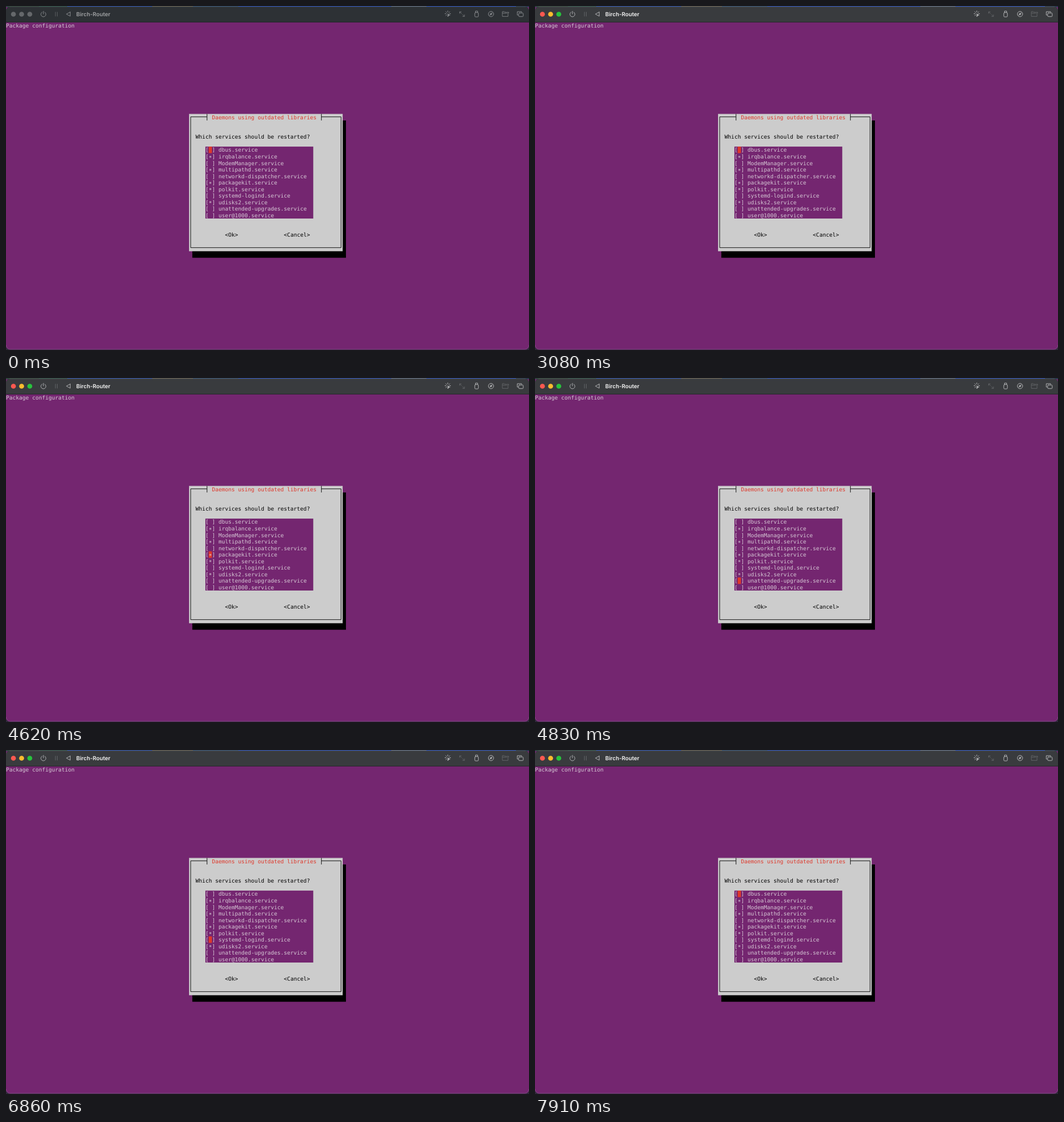
An HTML page with a canvas for the animation above (8 s loop, 923 by 607 pixels).

```html
<!DOCTYPE html>
<html lang="en">
<head>
<meta charset="utf-8">
<title>Package configuration</title>
<style>
  html, body { margin: 0; width: 100%; height: 100%; overflow: hidden; background: #742670; }
  canvas, svg { position: absolute; left: 0; top: 0; width: 923px; height: 607px; display: block; }
  text { font: 9.582px "DejaVu Sans Mono", monospace; text-rendering: geometricPrecision; white-space: pre; }
  #title { font: 600 9.8px Inter, sans-serif; }
</style>
</head>
<body>
<canvas id="stage" width="923" height="607"></canvas>
<svg id="labels" width="923" height="607" viewBox="0 0 923 607">
  <text id="title" x="124" y="18">Birch-Router</text>
</svg>
<script>
const W = 923, H = 607, LOOP = 8000;
// 160 columns of 8 x 16 cells, scaled to the stage width.
const CELL_W = W / 160, CELL_H = CELL_W * 2, TOP = 28.9;
const BASELINE = CELL_H * 13 / 16;
const PURPLE = '#742670', GRAY = '#cccccc', RED = '#de382b', LIGHT = '#d6c8d5';
const FOCUS_AT = 3080, LIST_ROW = 19;

const services = [
  ['dbus', 0], ['irqbalance', 1], ['ModemManager', 0], ['multipathd', 1],
  ['networkd-dispatcher', 0], ['packagekit', 1], ['polkit', 1],
  ['systemd-logind', 0], ['udisks2', 1], ['unattended-upgrades', 0], ['user@1000', 0]
];

const ctx = document.getElementById('stage').getContext('2d');
const labels = document.getElementById('labels');
const title = document.getElementById('title');
const colX = c => c * CELL_W;
const rowY = r => TOP + r * CELL_H;

function label(str, col, row, color, dy = 0) {
  const el = document.createElementNS('http://www.w3.org/2000/svg', 'text');
  el.setAttribute('x', colX(col));
  el.setAttribute('y', rowY(row) + BASELINE + dy);
  el.setAttribute('fill', color);
  el.textContent = str;
  labels.appendChild(el);
}

label('Package configuration', 0, 0, LIGHT);
label('Daemons using outdated libraries', 63, 14, RED);
label('Which services should be restarted?', 58, 17, '#000');
label('<Ok>', 67, 32, '#000');
label('<Cancel>', 85, 32, '#000');
services.forEach(([name, on], i) => {
  const row = LIST_ROW + i;
  label('[ ]', 61, row, LIGHT);
  if (on) label('*', 62, row, LIGHT, 1.7);
  label(name + '.service', 65, row, LIGHT);
});

function rect(x, y, w, h, color) {
  ctx.fillStyle = color;
  ctx.fillRect(x, y, w, h);
}

function cells(col, row, cols, rows, color) {
  rect(colX(col), rowY(row), cols * CELL_W, rows * CELL_H, color);
}

function disc(x, y, r, color) {
  ctx.fillStyle = color;
  ctx.beginPath();
  ctx.arc(x, y, r, 0, 7);
  ctx.fill();
}

function ring(x, y, r, from = 0, to = Math.PI * 2) {
  ctx.beginPath();
  ctx.arc(x, y, r, from, to);
  ctx.stroke();
}

function path(...pts) {
  ctx.beginPath();
  for (let i = 0; i < pts.length; i += 2) ctx.lineTo(pts[i], pts[i + 1]);
  ctx.stroke();
}

function box(x, y, w, h, r) {
  ctx.beginPath();
  ctx.roundRect(x, y, w, h, r);
  ctx.stroke();
}

// Selected row: one press, then a held key, in each direction.
function cursorRow(t) {
  const held = start => Math.round(Math.min(6, Math.floor((t - start) / 70)) * 4 / 3);
  if (t < 4200) return 0;
  if (t < 4480) return 1;
  if (t < 6580) return 2 + held(4480);
  if (t < 6790) return 9;
  return 8 - held(6790);
}

function desktopEdge() {
  rect(0, 0, W, 2, '#26384a');
  rect(0, 0, 58, 1.3, '#344b3c');
  rect(58, 0, 50, 1.3, '#315a4c');
  rect(108, 0, 150, 1.3, '#2b51b0');
  rect(258, 0, 72, 1.3, '#6b6553');
  rect(330, 0, 80, 1.3, '#365579');
  rect(410, 0, 270, 1.3, '#2850bd');
  rect(680, 0, 62, 1.3, '#657388');
  rect(742, 0, 158, 1.3, '#2850bd');
  rect(900, 0, 23, 1.3, '#293b50');
}

function leftIcons(main, dim) {
  ctx.strokeStyle = main;
  ring(66, 14.6, 4.4, -0.95, Math.PI + 0.95);
  path(66, 9.2, 66, 14);
  path(113.3, 10.6, 106.6, 14.3, 113.3, 18, 113.3, 10.6);
  ctx.strokeStyle = dim;
  path(87.2, 10.7, 87.2, 18);
  path(90.5, 10.7, 90.5, 18);
}

function rightIcons(main, resize, folder) {
  ctx.strokeStyle = main;
  for (let i = 0; i < 8; i++) {
    if (i === 1) continue;
    const c = Math.cos(i * Math.PI / 4), s = Math.sin(i * Math.PI / 4);
    path(779.7 + c * 2.8, 13.6 + s * 2.8, 779.7 + c * 5, 13.6 + s * 5);
  }
  ctx.fillStyle = main;
  ctx.beginPath();
  ctx.moveTo(779, 13);
  ctx.lineTo(784.5, 16.2);
  ctx.lineTo(782, 16.8);
  ctx.lineTo(780.6, 19);
  ctx.fill();

  box(827.3, 11.6, 6.4, 7.6, 1.5);
  path(828.6, 11.5, 828.6, 9, 832.4, 9, 832.4, 11.5);
  ring(856, 14.2, 4.7);
  ring(856, 14.2, 1.5);
  path(853.6, 16.5, 858.4, 11.9);
  // Two stacked windows; the front one hides part of the back one.
  path(903.8, 16, 902.3, 16, 902.3, 10, 910, 10, 910, 11);
  box(904.8, 12.3, 8, 6.4, 1.3);

  ctx.strokeStyle = resize;
  path(800.5, 13.2, 800.5, 10.3, 803.4, 10.3);
  path(800.5, 10.3, 803.8, 13.4);
  path(809, 15.4, 809, 18.4, 806, 18.4);
  path(809, 18.4, 805.8, 15.3);

  ctx.strokeStyle = folder;
  path(883, 10.9, 880.4, 10.9, 879.2, 9.9, 876, 9.9, 876, 18.4, 886, 18.4, 886, 14.4);
  path(876, 12.7, 883.2, 12.7);
  path(883.2, 11.9, 887.2, 11.9);
  path(885.6, 10.2, 887.3, 11.9, 885.6, 13.6);
}

function titleBar(active) {
  desktopEdge();
  ctx.fillStyle = active ? '#393b3e' : '#2d3135';
  ctx.beginPath();
  ctx.roundRect(0, 1.2, W, TOP - 1.2, [7, 7, 0, 0]);
  ctx.fill();
  rect(6, 1.2, W - 12, 0.7, active ? '#56585b' : '#484c50');
  rect(0, TOP - 0.8, W, 0.8, '#202225');

  const lights = active ? ['#ff5950', '#fdbc2e', '#28c33d'] : Array(3).fill('#65686b');
  lights.forEach((color, i) => disc(13.1 + i * 14.44, 14.5, 4.35, color));
  ctx.lineWidth = 1;
  ctx.lineCap = ctx.lineJoin = 'round';
  const main = active ? '#b2b3b5' : '#898c8f';
  leftIcons(main, active ? '#626467' : '#5b5f62');
  rightIcons(main, active ? '#606265' : '#6f7275', active ? '#606265' : '#777a7d');
  title.setAttribute('fill', active ? '#f4f4f4' : '#a0a2a4');
}

function dialog(row) {
  cells(57, 15, 47, 21, '#000');
  cells(56, 14, 47, 21, GRAY);
  const left = colX(56.5), right = colX(102.5), y1 = rowY(14.45), y2 = rowY(34.45);
  const tabL = colX(61.5), tabR = colX(96.5);
  ctx.strokeStyle = '#000';
  ctx.lineWidth = 0.9;
  ctx.lineCap = 'butt';
  path(tabL, y1, left, y1, left, y2, right, y2, right, y1, tabR, y1);
  for (const x of [tabL, tabR]) path(x, rowY(14), x, rowY(15));
  cells(61, LIST_ROW, 33, services.length, PURPLE);
  cells(62, LIST_ROW + row, 1, 1, RED);
}

function windowEdge() {
  ctx.fillStyle = '#30283b';
  ctx.beginPath();
  ctx.rect(0, 590, W, 17);
  ctx.roundRect(0, 570, W, 36.3, [0, 0, 7, 7]);
  ctx.save();
  ctx.clip('evenodd');
  ctx.fillRect(0, 598, W, 9);
  ctx.restore();
  ctx.strokeStyle = '#87508a';
  ctx.lineWidth = 0.7;
  ctx.beginPath();
  ctx.moveTo(0.4, 598);
  ctx.arcTo(0.4, 605.7, 8, 605.7, 7);
  ctx.arcTo(W - 0.4, 605.7, W - 0.4, 598, 7);
  ctx.lineTo(W - 0.4, 598);
  ctx.stroke();
}

function draw() {
  const t = performance.now() % LOOP;
  rect(0, 0, W, H, PURPLE);
  titleBar(t >= FOCUS_AT);
  dialog(cursorRow(t));
  windowEdge();
  requestAnimationFrame(draw);
}
draw();
</script>
</body>
</html>
```
